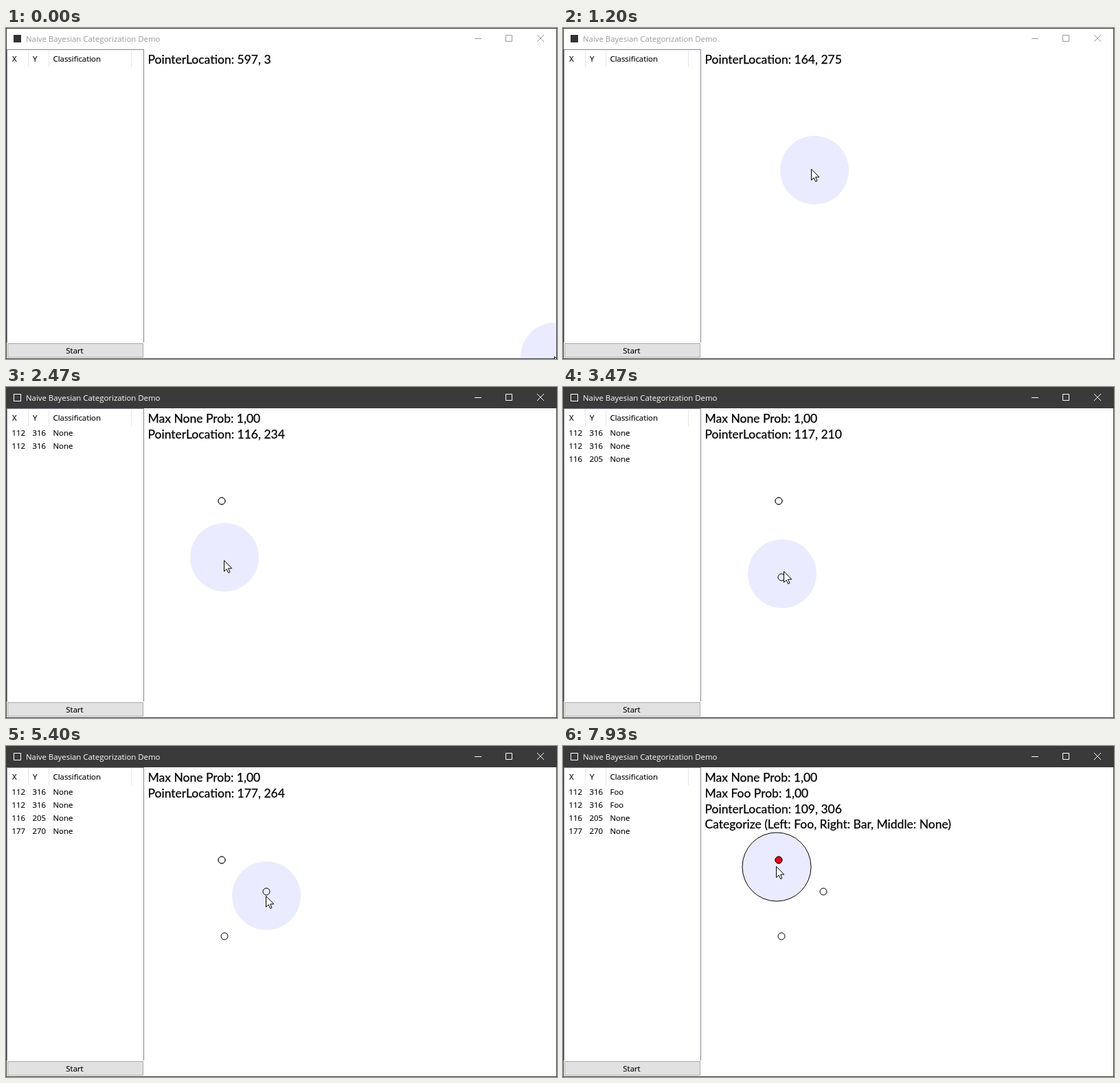
Animation of 802x482 px, one loop 8 s. Source, as an HTML page:

```html
<!DOCTYPE html>
<html lang="en">
<head>
<meta charset="utf-8">
<title>Naive Bayesian Categorization Demo</title>
<style>
html, body { margin: 0; width: 100%; height: 100%; overflow: hidden; background: #fff; }
svg { display: block; width: 802px; height: 482px; }
text { white-space: pre; }
.ui { font: 11.4px "Open Sans", "Noto Sans", sans-serif; }
.dark { stroke: #000; stroke-width: .15px; }
.big { font: 17.5px Lato, sans-serif; stroke: #000; stroke-width: .25px; }
</style>
</head>
<body>
<svg viewBox="0 0 802 482">
  <rect width="802" height="482" fill="#fff"/>
  <g id="dots" stroke="#000"></g>
  <circle id="disc" r="50" fill="#00f" fill-opacity=".078"/>
  <circle id="ring" fill="none" stroke="#000"/>
  <g id="lines" class="big"></g>

  <rect id="bar" width="802" height="31"/>
  <rect id="icon" x="11.5" y="10.5" width="10" height="10"/>
  <text id="title" class="ui" x="29" y="20">Naive Bayesian Categorization Demo</text>
  <path id="buttons" fill="none" d="M682 15.5h10M727.5 10.5h9v9h-9zM773 10l10 10M783 10l-10 10"/>

  <rect x="1.5" y="31.5" width="199" height="430" fill="#fff" stroke="#828790"/>
  <path d="M32.5 33v24M62.5 33v24M182.5 33v24" stroke="#e5e5e5"/>
  <g class="ui dark">
    <text x="9" y="49">X</text>
    <text x="39" y="49">Y</text>
    <text x="68.5" y="49">Classification</text>
  </g>
  <g id="rows" class="ui dark"></g>
  <rect x="1" y="458" width="200" height="23" fill="#fff"/>
  <rect x="2.5" y="459.5" width="197" height="20" fill="#e1e1e1" stroke="#adadad"/>
  <text class="ui dark" x="100" y="474" text-anchor="middle">Start</text>

  <rect x=".5" y=".5" width="801" height="481" fill="none" stroke="#3c3c3c"/>
  <path id="cursor" fill="#fff" stroke="#000" d="M.5 .5V16.5L4.2 13.1L6.7 18.6L9 17.6L6.6 12.1H11.8Z"/>
</svg>
<script>
const STEP = 200 / 3, STEPS = 120, RADIUS = 50;
const ACTIVE = 32, CATEGORIZE = 92, TAGGED = 117, RELABEL = TAGGED + 2, ROW_DELAY = 2;

// glides of the pointer: first step, last step, end point
const home = [799, 479];
const glides = [
  [1, 4, 725, 358],
  [8, 10, 527, 282], [11, 14, 384, 212],
  [18, 20, 342, 200],
  [23, 26, 314, 166],
  [34, 40, 320, 288],
  [43, 45, 318, 277],
  [52, 52, 319, 272], [53, 53, 328, 262], [54, 57, 379, 212],
  [81, 81, 379, 218], [82, 82, 379, 222],
  [105, 105, 364, 216], [106, 108, 318, 183],
  [113, 115, 311, 176]
];

// pointer place and the step of the click
const points = [
  { at: [112, 316], step: 32, tagged: true },
  { at: [112, 316], step: 32, tagged: true },
  { at: [116, 205], step: 49 },
  { at: [177, 270], step: 66 }
];

const $ = id => document.getElementById(id);
const set = (el, attrs) => {
  for (const k in attrs) el.setAttribute(k, attrs[k]);
  return el;
};
const add = (parent, tag, attrs) =>
  parent.appendChild(set(document.createElementNS("http://www.w3.org/2000/svg", tag), attrs));
const show = (el, on) => { el.style.display = on ? "" : "none"; };
const clamp = u => Math.min(1, Math.max(0, u));
const easeOut = u => u * (1.4 - 0.4 * u);

function pointerAt(n) {
  let [x, y] = home;
  for (const [first, last, toX, toY] of glides) {
    const u = easeOut(clamp((n - first + 1) / (last - first + 1)));
    x += (toX - x) * u;
    y += (toY - y) * u;
  }
  return [Math.round(x), Math.round(y)];
}

for (const [i, p] of points.entries()) {
  const [px, py] = p.at;
  p.dot = add($("dots"), "circle", { cx: px + 202, cy: 482 - py, r: 5 });
  p.row = add($("rows"), "g", {});
  const cells = [8.5, 38.5, 68.5].map(x => add(p.row, "text", { x, y: 71 + 19 * i }));
  cells[0].textContent = px;
  cells[1].textContent = py;
  p.label = cells[2];
}
const lines = [0, 1, 2, 3].map(i => add($("lines"), "text", { x: 206.5, y: 52.3 + 22.6 * i }));

function drawWindow(active) {
  const ink = active ? "#fff" : "#999";
  set($("bar"), { fill: active ? "#3a3a3a" : "#fff" });
  set($("title"), { fill: ink });
  set($("buttons"), { stroke: ink });
  set($("icon"), active ? { fill: "none", stroke: "#fff" } : { fill: "#333", stroke: "#333" });
}

function drawPointer(n) {
  const [x, y] = pointerAt(n), [x0, y0] = pointerAt(n - 1), [x1, y1] = pointerAt(n + 1);
  // the arrow runs a little ahead of the disc while moving
  const lead = x !== x0 || y !== y0 ? 0.32 : 0;
  const tipX = x - 1 + Math.round((x1 - x) * lead);
  const tipY = y - 1 + Math.round((y1 - y) * lead);
  set($("disc"), { cx: x, cy: y });
  set($("cursor"), { transform: `translate(${tipX} ${tipY})` });
  show($("ring"), n >= CATEGORIZE);
  const shrink = 1 - clamp((n - CATEGORIZE) / 3);
  set($("ring"), { cx: x, cy: y, r: RADIUS + 47 * shrink });
  return `PointerLocation: ${x - 202}, ${482 - y}`;
}

function draw(n) {
  drawWindow(n >= ACTIVE);
  for (const p of points) {
    show(p.dot, n >= p.step);
    show(p.row, n >= p.step + ROW_DELAY);
    set(p.dot, { fill: p.tagged && n >= TAGGED ? "#f00" : "#fff" });
    p.label.textContent = p.tagged && n >= RELABEL ? "Foo" : "None";
  }
  const info = [
    n >= ACTIVE && "Max None Prob: 1,00",
    n >= TAGGED && "Max Foo Prob: 1,00",
    drawPointer(n),
    n >= CATEGORIZE && "Categorize (Left: Foo, Right: Bar, Middle: None)"
  ].filter(Boolean);
  lines.forEach((el, i) => { el.textContent = info[i] || ""; });
}

const start = performance.now();
function tick() {
  draw(Math.floor((performance.now() - start + 4) / STEP) % STEPS);
  requestAnimationFrame(tick);
}
tick();
</script>
</body>
</html>
```
